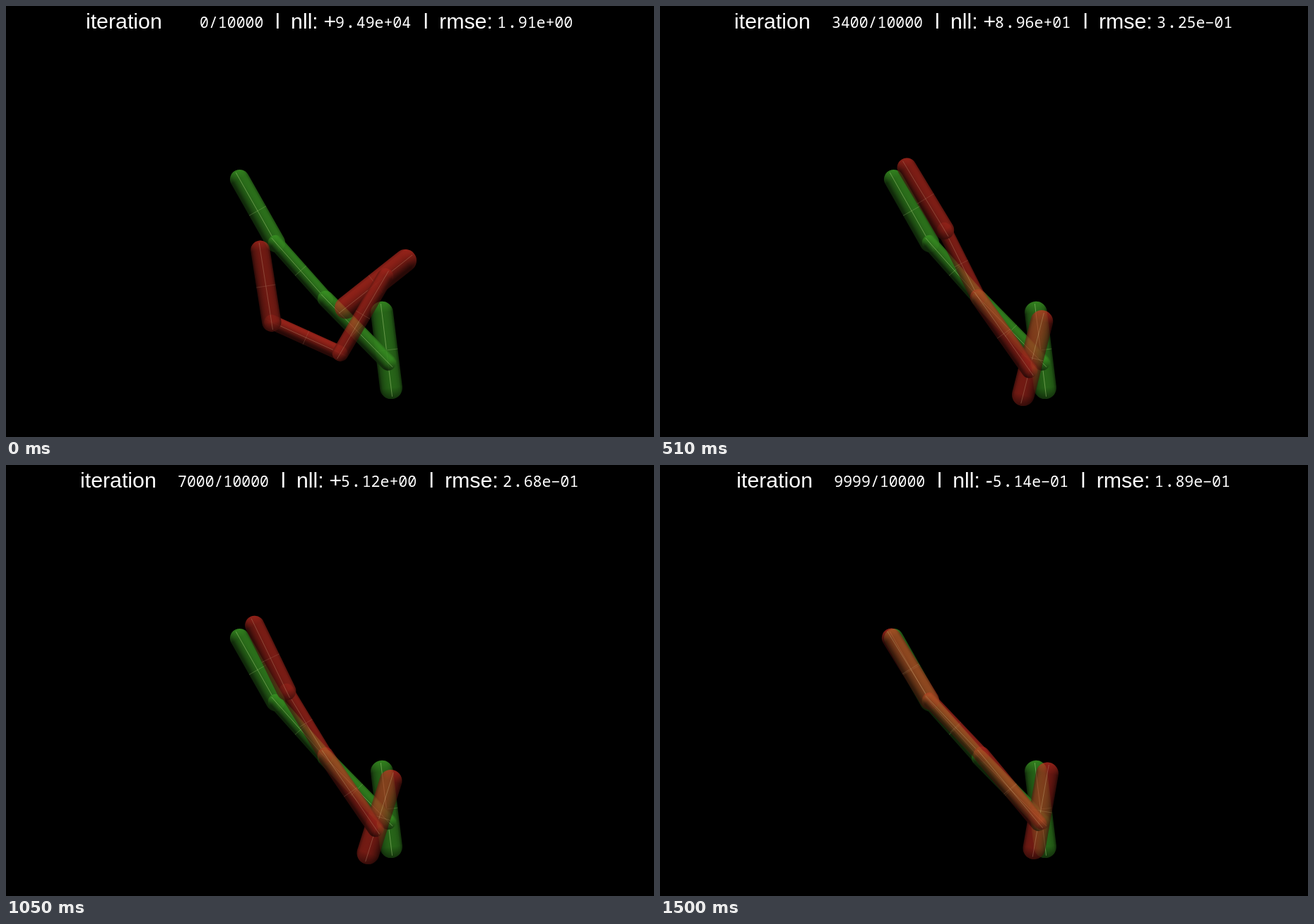
An HTML page with a canvas for the animation above (2530 ms loop, 917 px wide and 611 px high).

```html
<!DOCTYPE html>
<html lang="en">
<head>
<meta charset="utf-8">
<style>
  html, body { margin: 0; width: 100%; height: 100%; overflow: hidden; background: #000; }
  canvas { position: absolute; left: 0; top: 0; }
  #fit { opacity: .7; }
</style>
</head>
<body>
<canvas id="goal" width="917" height="611"></canvas>
<canvas id="fit" width="917" height="611"></canvas>
<canvas id="label" width="917" height="611"></canvas>
<script>
const [goal, fit, label] = ['goal', 'fit', 'label'].map(id => document.getElementById(id).getContext('2d'));
const STEP = 30, LAST = 50, LOOP = 2530;
const GREEN = { base: [62, 160, 38], line: '190,225,140' };
const RED = { base: [255, 60, 44], line: '255,190,150' };

// step, hip x, hip y, angles of torso, thigh, leg, foot (degrees), foot in front, nll, rmse
const KEYS = [
  [0, 536.8, 383.4, 141.5, 120.3, 204.4, 261.1, 1, 9.49e4, 1.91],
  [8, 523.2, 516.8, 288.1, 237.9, 236.9, 240, 0, 352, .443],
  [17, 522.8, 516.1, 284.2, 234.9, 243.4, 238.9, 1, 89.6, .325],
  [23, 523.2, 515.5, 291.5, 236.2, 240, 236.9, 0, 31, .31],
  [30, 518.9, 518.4, 291, 239.8, 239.9, 242.7, 1, 13, .253],
  [40, 527.6, 513, 283.8, 231.5, 237.7, 245.7, 1, 2.02, .283],
  [50, 535.7, 507.5, 280, 230.2, 226.5, 238.5, 0, -.514, .189]
];
const GOAL_POSE = [540.6, 505.3, 263, 225.6, 228.4, 240.5, 0];

const rad = deg => deg * Math.PI / 180;
const move = ([x, y], deg, d) => [x + d * Math.cos(rad(deg)), y + d * Math.sin(rad(deg))];
const mix = (a, b, u) => a + (b - a) * u;
const mixLog = (a, b, u) => a > 0 && b > 0 ? a * (b / a) ** u : mix(a, b, u);

function stroke(c, a, b, color) {
  c.strokeStyle = color;
  c.beginPath();
  c.moveTo(...a);
  c.lineTo(...b);
  c.stroke();
}

function cap(c, p, deg, r, base) {
  const lift = -Math.sin(rad(deg));
  const rgb = lift > 0 ? base : [0, 0, 0];
  const g = c.createLinearGradient(...p, ...move(p, deg, r));
  g.addColorStop(0, `rgba(${rgb},0)`);
  g.addColorStop(1, `rgba(${rgb},${.5 * Math.abs(lift)})`);
  c.fillStyle = g;
  c.beginPath();
  c.arc(...p, r, rad(deg - 90), rad(deg + 90));
  c.fill();
}

function capsule(c, a, deg, len, r, { base, line }) {
  const b = move(a, deg, len), mid = move(a, deg, len / 2);
  const up = -Math.sin(rad(deg + 90));
  const g = c.createLinearGradient(...move(mid, deg - 90, r), ...move(mid, deg + 90, r));
  for (let s = -1; s <= 1; s += .25) {
    const lit = .25 + .75 * Math.max(0, .8 * s * up + .6 * Math.sqrt(1 - s * s));
    g.addColorStop((s + 1) / 2, `rgb(${base.map(v => Math.round(v * lit))})`);
  }
  c.globalAlpha = .88;
  c.fillStyle = g;
  c.beginPath();
  c.arc(...a, r, rad(deg + 90), rad(deg + 270));
  c.arc(...b, r, rad(deg - 90), rad(deg + 90));
  c.fill();
  c.globalAlpha = 1;
  cap(c, a, deg + 180, r, base);
  cap(c, b, deg, r, base);
  c.lineWidth = 1;
  stroke(c, move(a, deg, -r * .8), move(b, deg, r * .8), `rgba(${line},.42)`);
  stroke(c, move(mid, deg - 90, r), move(mid, deg + 90, r), `rgba(${line},.25)`);
}

function body(c, [x, y, torso, thigh, leg, foot, front], skin) {
  const hip = [x, y], knee = move(hip, thigh, 126), ankle = move(knee, leg, 107);
  c.clearRect(0, 0, 917, 611);
  capsule(c, move(hip, torso, -36), torso, 107, 16, skin);
  const drawFoot = () => capsule(c, ankle, foot, 103, 13.7, skin);
  if (!front) drawFoot();
  capsule(c, knee, leg, 107, 10.5, skin);
  if (front) drawFoot();
  capsule(c, hip, thigh, 126, 11.5, skin);
}

function sans(text, x) {
  label.font = '30.3px "Liberation Sans", Arial, sans-serif';
  label.fillText(text, x, 32);
}

function mono(text, x, size = 21.5) {
  label.font = size + 'px "Noto Sans Mono", monospace';
  label.fillText(text, x, 31);
}

function number(v, x) {
  const [m, e] = Math.abs(v).toExponential(2).split('e');
  mono(m[0], x);
  mono('.', x + 13, 28);
  mono(m.slice(2) + 'e' + (e < 0 ? '\u2212' : '+') + Math.abs(e).toString().padStart(2, '0'), x + 29.7);
}

function caption(k, nll, rmse) {
  const count = String(Math.min(k * 200, 9999));
  const pad = 4 - count.length;
  const cut = nll < 0 ? 6.5 : 0;
  const left = 458.5 - (703 - 5.3 * pad - cut) / 2;
  const x = left - 5.3 * pad;
  label.clearRect(0, 0, 917, 50);
  label.fillStyle = '#fff';
  sans('iteration', left - 2);
  mono(count + '/10000', left + 136 + 7.7 * pad);
  sans('l', x + 282);
  sans('nll:', x + 304);
  sans(nll < 0 ? '-' : '+', x + 350.5);
  number(nll, x + 367 - cut);
  sans('l', x + 491.7 - cut);
  sans('rmse:', x + 514 - cut);
  number(rmse, x + 596 - cut);
}

let shown = -1;
function show(k) {
  const i = Math.max(1, KEYS.findIndex(key => key[0] >= k));
  const a = KEYS[i - 1], b = KEYS[i];
  const u = (k - a[0]) / (b[0] - a[0]);
  const e = i === 1 ? 1 - (1 - u) ** 2 : u;
  const pose = a.slice(1, 7).map((v, j) => mix(v, b[j + 1], e));
  body(fit, [...pose, (u < .5 ? a : b)[7]], RED);
  caption(k, mixLog(a[8], b[8], u), mixLog(a[9], b[9], u));
}

const start = performance.now();
function tick() {
  const k = Math.min(LAST, Math.floor((performance.now() - start) % LOOP / STEP));
  if (k !== shown) show(shown = k);
  requestAnimationFrame(tick);
}

body(goal, GOAL_POSE, GREEN);
tick();
</script>
</body>
</html>
```
